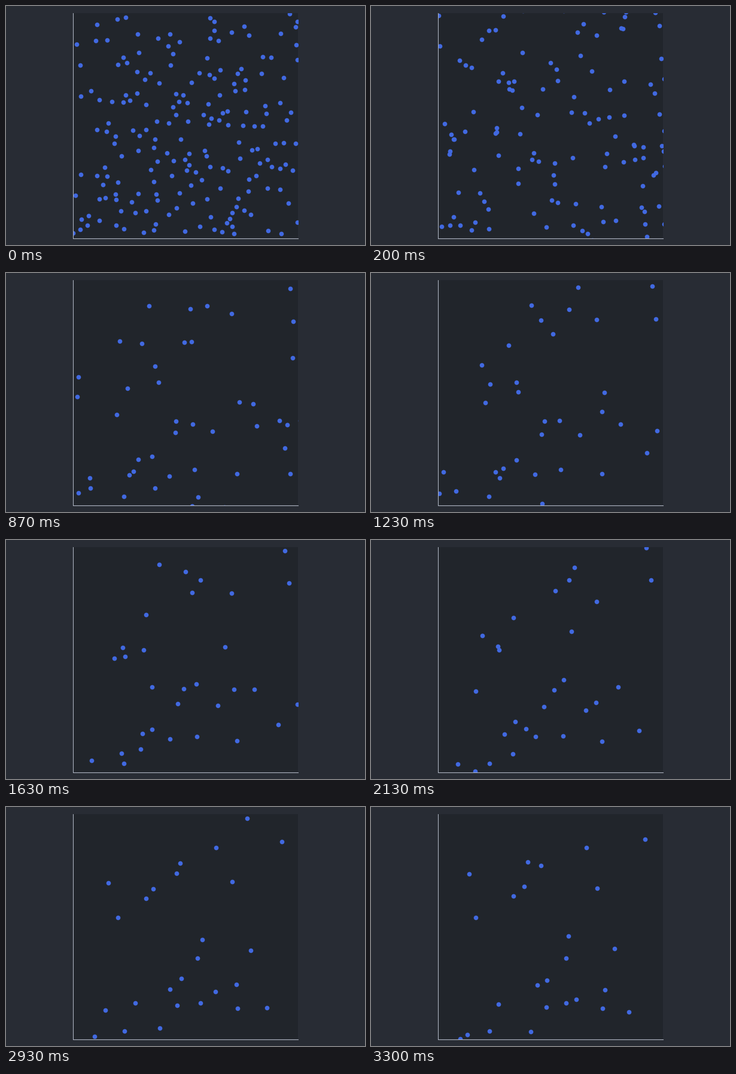
Recreate the animation shown at these times as a matplotlib script. Size 600 by 400 pixels, loop 3.33 s.

```python
import itertools
import math
import random

import matplotlib.pyplot as plt
import numpy as np
from matplotlib.animation import FuncAnimation

W, H, DPI = 600, 400, 100
LEFT, TOP, RIGHT, BOTTOM = 112, 12, 488, 388
STEPS, SUBSTEPS = 100, 4   # positions per loop, collision checks per position
TICKS, TICK = 333, 10      # animation frames and their length in ms
DIAMETER = 14.4            # distance at which two particles bounce
STRAYS = 170

# Slow particles that stay in view: x, y and velocity per step.
slow = [
    (385.5, 336, .02, .02), (479, 275.6, -.48, .69), (312, 330, .15, -.02),
    (138, 351, .12, .38), (424, 263.5, -.17, -.26), (306, 266, .25, -.5),
    (467.5, 265, -2.07, -1.74), (219, 110.5, .31, .31),
    (169.5, 57, 2.68, -.07), (348.5, 41, -.46, .55),
    (284, 147, .56, -1.19), (335.5, 251.5, .38, .53),
    (401, 177.5, -.39, 1.49), (212, 208, -.33, -.57),
    (169, 285, .62, -1.83), (269, 246, .58, .08), (280, 259, .15, .32),
    (272, 349, .06, -.31), (247.5, 294.5, -.12, .5), (192, 343, .81, -.42),
]


def bounce(pos, vel, i, j):
    """Elastic collision of two equal discs."""
    gap = pos[j] - pos[i]
    dist = math.hypot(*gap)
    if dist < DIAMETER:
        normal = gap / dist
        approach = (vel[i] - vel[j]) @ normal
        if approach > 0:
            vel[i] -= approach * normal
            vel[j] += approach * normal


def simulate(start):
    """Positions of the colliding particles at every step."""
    state = np.array(start, dtype=float)
    pos, vel = state[:, :2], state[:, 2:]
    track = []
    for _ in range(STEPS):
        track.append(pos.copy())
        for _ in range(SUBSTEPS):
            pos += vel / SUBSTEPS
            for i, j in itertools.combinations(range(len(pos)), 2):
                bounce(pos, vel, i, j)
    return np.array(track)


def edge_distance(x, y, ux, uy):
    """Way from a point to the edge of the box along a direction."""
    dx = ((RIGHT if ux > 0 else LEFT) - x) / ux
    dy = ((BOTTOM if uy > 0 else TOP) - y) / uy
    return min(dx, dy)


def scatter_strays(taken, rng):
    """Random particles; the share still in view falls off as 1 / time."""
    taken = [(p[0], p[1]) for p in taken]
    strays = []
    while len(strays) < STRAYS:
        x, y = rng.uniform(LEFT, RIGHT), rng.uniform(TOP, BOTTOM)
        if any(math.hypot(x - a, y - b) < 8 for a, b in taken):
            continue
        angle = rng.uniform(0, 2 * math.pi)
        ux, uy = math.cos(angle), math.sin(angle)
        exit_step = 3.3 * STRAYS / (len(strays) + 0.5)
        speed = (edge_distance(x, y, ux, uy) + 4) / exit_step
        taken.append((x, y))
        strays.append((x, y, speed * ux, speed * uy))
    return np.array(strays)


strays = scatter_strays(slow, random.Random(8))
steps = np.arange(STEPS)[:, None, None]
straight = strays[:, :2] + steps * strays[:, 2:]
track = np.concatenate([simulate(slow), straight], axis=1) - 0.5

fig = plt.figure(figsize=(W / DPI, H / DPI), dpi=DPI, facecolor="#282c34")
ax = fig.add_axes([LEFT / W, 1 - BOTTOM / H, (RIGHT - LEFT) / W,
                   (BOTTOM - TOP) / H], facecolor="#21252b")
for side in ("top", "right"):
    ax.spines[side].set_visible(False)
for side in ("left", "bottom"):
    # half a pixel outward, so the line lies just outside the box
    ax.spines[side].set_position(("outward", 0.36))
    ax.spines[side].set(color="#abb2bf", linewidth=0.8)
ax.set(xlim=(LEFT, RIGHT), ylim=(BOTTOM, TOP), xticks=[], yticks=[])
dots, = ax.plot([], [], "o", color="royalblue", markersize=5.5,
                markeredgewidth=0)


def update(tick):
    step = (tick * TICK + TICK // 2) * 3 // 100
    dots.set_data(track[step].T)
    return dots,


anim = FuncAnimation(fig, update, frames=TICKS, interval=TICK,
                     repeat=True, repeat_delay=0, blit=False)
plt.show()
```
